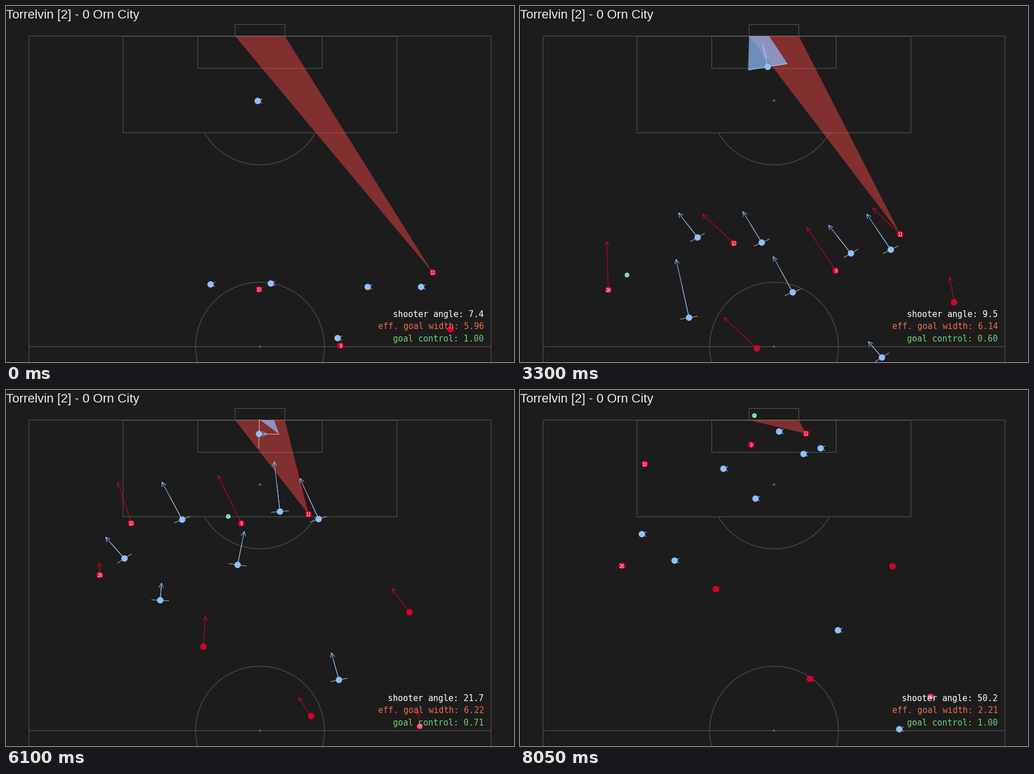
Animation, 894 px wide and 626 px high, one loop 8.35 s. Source, as a matplotlib script:

```python
import numpy as np
import matplotlib.pyplot as plt
from matplotlib.animation import FuncAnimation
from matplotlib.patches import Arc, Circle, Polygon, Rectangle

W, H, DPI = 894, 626, 100
PX = 72 / DPI
STEP, FRAMES, LAST = 50, 167, 161
KEY_TIMES = np.array([0, 1.35, 3.3, 5.45, 6.75, 8.05])

BG, LINE = "#1c1c1c", "#5a5a5a"
RED, BLUE, WHITE = "#d8002f", "#8fbfff", "#ffffff"

SCALE = np.array([11.956, 10.3])  # pixels per metre, across and along
MID_X, GOAL_Y, HALF_Y = 447, 53, 599
POSTS = MID_X + 3.66 * SCALE[0] * np.array([-1, 1])


def spline_slopes(t, p):
    """Velocities of the smooth cubic spline through p, parabolic at both ends."""
    h = np.diff(t)
    d = np.diff(p, axis=0) / h[:, None]
    a, r = np.eye(len(t)), np.zeros_like(p)
    a[0, 1] = a[-1, -2] = 1
    r[0], r[-1] = 2 * d[0], 2 * d[-1]
    for i in range(1, len(t) - 1):
        a[i, i - 1:i + 2] = h[i], 2 * (h[i - 1] + h[i]), h[i - 1]
        r[i] = 3 * (h[i] * d[i - 1] + h[i - 1] * d[i])
    return np.linalg.lstsq(a, r, rcond=None)[0]


class Player:
    """Runs a smooth path; the points belong to the last key times."""

    def __init__(self, color, xs, ys, label="", vel=None):
        self.t = KEY_TIMES[-len(xs):]
        self.p = np.array([xs, ys], float).T
        self.v = spline_slopes(self.t, self.p) if vel is None else np.array(vel, float).T
        z = 4 if color == RED else 6
        self.dot = ax.add_patch(Circle((0, 0), 5.6, fc=color, lw=0, zorder=z))
        self.tag = ax.text(0, 0, label, color=WHITE, fontsize=7.6 * PX,
                           family="DejaVu Sans", ha="center",
                           va="center_baseline", zorder=z + 0.5)

    def at(self, t):
        if t <= self.t[0]:
            return self.p[0] + self.v[0] * (t - self.t[0]), self.v[0]
        i = min(np.searchsorted(self.t, t, side="right") - 1, len(self.t) - 2)
        h = self.t[i + 1] - self.t[i]
        s = (t - self.t[i]) / h
        p0, p1, v0, v1 = self.p[i], self.p[i + 1], self.v[i] * h, self.v[i + 1] * h
        a = 2 * (p0 - p1) + v0 + v1
        b = 3 * (p1 - p0) - 2 * v0 - v1
        return ((a * s + b) * s + v0) * s + p0, ((3 * a * s + 2 * b) * s + v0) / h

    def place(self, pos):
        self.dot.center = pos
        self.tag.set_position((pos[0], pos[1] + 0.3))


def limbs(pos, vel, arm):
    """End points of the left, right and forward reach, arm in metres."""
    vm = vel / SCALE
    speed = max(np.hypot(*vm), 1e-6)
    u = vm / speed
    side = np.array([u[1], -u[0]]) * arm
    return [pos + d * SCALE for d in (side, -side, u * (arm + 0.42 * speed))]


def draw_pitch():
    style = dict(fill=False, ec=LINE, lw=PX, zorder=1)

    def box(width, depth):
        w, d = np.array([width, depth]) * SCALE
        ax.add_patch(Rectangle((MID_X - w / 2, GOAL_Y), w, d, snap=False, **style))

    for size in ((68, 60), (40.32, 16.5), (18.32, 5.5), (7.32, -2)):
        box(*size)
    ax.plot([40.5, 853.5], [HALF_Y] * 2, color=LINE, lw=PX, zorder=1, snap=False)
    spot = GOAL_Y + 11 * SCALE[1]
    ax.add_patch(Circle((MID_X, HALF_Y), 113.3, **style))
    ax.add_patch(Arc((MID_X, spot), 226, 226, theta1=30.1, theta2=149.9,
                     ec=LINE, lw=PX, zorder=1))
    for y in (spot, HALF_Y):
        ax.add_patch(Circle((MID_X, y), 2.2, fc=LINE, lw=0, zorder=1))


def path(color, z, alpha=1):
    return ax.plot([], [], color=color, lw=PX, zorder=z, alpha=alpha,
                   solid_capstyle="butt")[0]


def set_path(line, strokes):
    gap = np.full(2, np.nan)
    pts = [p for s in strokes for p in (*s, gap)] or [gap]
    line.set_data(*np.array(pts).T)


def arrow(pos, vel):
    size = np.hypot(*vel)
    u = vel / size if size > 1e-6 else np.array([-1.0, 0])
    n = np.array([-u[1], u[0]])
    tip = pos + vel
    return [(pos, tip), (tip - 8 * u + 4 * n, tip, tip - 8 * u - 4 * n)]


def shot_stats(pos):
    depth = (pos[1] - GOAL_Y) / SCALE[1]
    dx = (pos[0] - POSTS) / SCALE[0]
    angle = abs(np.subtract(*np.arctan2(dx, depth)))
    return np.degrees(angle), angle * np.hypot(dx, depth).min()


def shadow(shooter, reach, vel):
    """Part of the goal hidden by the keeper, with its outline."""
    left, right, front = reach
    if abs(vel[0]) <= abs(vel[1]):
        a, b = left, right
    elif vel[0] > 0:
        a, b = left, front
    else:
        a, b = front, right
    if min(shooter[1] - a[1], shooter[1] - b[1]) < 1:
        return 0, None
    xs = [shooter[0] + (q[0] - shooter[0]) * (shooter[1] - GOAL_Y) / (shooter[1] - q[1])
          for q in (a, b)]
    xa, xb = np.clip(xs, *POSTS)
    part = abs(xb - xa) / np.ptp(POSTS)
    return part, [a, b, (xb, GOAL_Y), (xa, GOAL_Y)]


fig = plt.figure(figsize=(W / DPI, H / DPI), dpi=DPI, facecolor=BG)
ax = fig.add_axes([0, 0, 1, 1])
ax.set(xlim=(0, W), ylim=(H, 0))
ax.axis("off")
ax.add_patch(Rectangle((0, 0), W, H, fill=False, ec="#0c0c0c", lw=2 * PX))
draw_pitch()

shooter = Player(RED, [750.5, 729, 669, 552.2, 520.2, 503.2],
                 [468.5, 463, 401, 271, 165.4, 76.6], "11")
reds = [
    shooter,
    Player(RED, [445, 438, 376, 242.5, 210.5, 219.5],
           [498.5, 488, 417, 282, 190, 130], "10"),
    Player(RED, [588.5, 622, 555.5, 444.5, 394, 406.5],
           [597, 582.5, 465.5, 290, 182, 96], "9"),
    Player(RED, [188.5, 155.5, 164.5, 165.5, 179],
           [660, 499, 345.5, 315.5, 309], "26"),
    Player(RED, [726, 722], [574, 539], "66"),
    Player(RED, [782, 772.5, 764, 729, 690, 655.5],
           [568.5, 580, 521, 419, 364, 310]),
    Player(RED, [417, 347.5, 350, 344.5], [602, 486, 417, 350]),
    Player(RED, [553, 524.5, 510], [594.5, 552, 508]),
]

# The keeper turns sharply, so his velocities are set as well.
keeper = Player(BLUE, [443, 446, 436, 437, 456, 456], [167, 152.5, 107, 77, 76, 73],
                vel=[[6, -2, -5, 12, 19, -19], [-3, -18, -23, -0.6, -5, 0]])
blues = [
    keeper,
    Player(BLUE, [360, 361, 312.5, 233, 193, 214.5],
           [489.5, 482, 407, 321.5, 274.5, 253.5]),
    Player(BLUE, [466, 469, 425.5, 338, 297, 358],
           [488, 486, 416, 273, 188.5, 138.5]),
    Player(BLUE, [583.5, 528, 480, 405.5, 416, 414.5],
           [584, 582.5, 503.5, 348, 270, 191]),
    Player(BLUE, [636.5, 631, 582.5, 494, 480, 499],
           [494, 486, 435, 273, 162.5, 112.5]),
    Player(BLUE, [730.5, 727.5, 652.5, 573, 532.5, 529],
           [494, 509.5, 428.5, 274.5, 182, 102.5]),
    Player(BLUE, [297.5, 271, 273, 272], [548, 392.5, 350.5, 300]),
    Player(BLUE, [637, 595, 577.5, 559.5], [618, 540, 479, 422.5]),
    Player(BLUE, [688, 667.5], [645, 596.5]),
]

# Pass out wide, dribble, cross, header: straight legs of (time, x, y).
BALL = np.array([(0, 613, 669), (3.52, 160, 460), (4.45, 162, 404),
                 (4.72, 168, 361), (6.86, 514, 146), (8.05, 412.5, 45)]).T
ball = ax.add_patch(Circle((0, 0), 3.5, fc="#4fe3a5", ec=WHITE, lw=0.9 * PX, zorder=8))

cone = ax.add_patch(Polygon([(0, 0)] * 3, fc="#ff4848", alpha=0.45, lw=0, zorder=2))
block = ax.add_patch(Polygon([(0, 0)] * 4, fc=BLUE, alpha=0.7, lw=0, zorder=2.5))
red_arrows = path(RED, 3)
reach_lines = path("#f0f0f0", 4.8, 0.75)
blue_arrows = path(BLUE, 5)

ax.text(0, 22, "Torrelvin [2] - 0 Orn City", color="#ececec", fontsize=22.3 * PX,
        family="Liberation Sans", zorder=9)
stats = [ax.text(841, y, "", color=c, fontsize=14.72 * PX, family="DejaVu Sans Mono",
                 ha="right", va="baseline", zorder=9)
         for y, c in ((547, WHITE), (568, "#e8704a"), (590, "#70d078"))]


def update(frame):
    n = min(frame, LAST)
    t = n * STEP / 1000
    still = n in (0, LAST)

    for team, line in ((reds, red_arrows), (blues, blue_arrows)):
        strokes = []
        for pl in team:
            pos, vel = pl.at(t)
            pl.place(pos)
            strokes += arrow(pos, vel * (not still))
        set_path(line, strokes)

    spot = shooter.at(t)[0]
    cone.set_xy([(POSTS[0], GOAL_Y), (POSTS[1], GOAL_Y), spot])

    hidden, outline, arms = 0, None, []
    if not still:
        for pl in blues:
            pos, vel = pl.at(t)
            arm = np.interp(t, (5.45, 6.75), (2.95, 2)) if pl is keeper else 1.3
            reach = limbs(pos, vel, arm)
            arms += [(reach[0], reach[1]), (pos, reach[2])]
            if pl is keeper:
                hidden, outline = shadow(spot, reach, vel)
    set_path(reach_lines, arms)

    if hidden < 0.05:
        hidden = 0
    block.set_visible(hidden > 0)
    if hidden:
        block.set_xy(outline)

    ball.center = [np.interp(t, BALL[0], c) for c in BALL[1:]]

    angle, width = shot_stats(spot)
    stats[0].set_text(f"shooter angle: {angle:.1f}")
    stats[1].set_text(f"eff. goal width: {width:.2f}")
    stats[2].set_text(f"goal control: {1 - hidden:.2f}")
    return []


anim = FuncAnimation(fig, update, frames=FRAMES, interval=STEP, repeat=True,
                     repeat_delay=0, blit=False)
plt.show()
```
